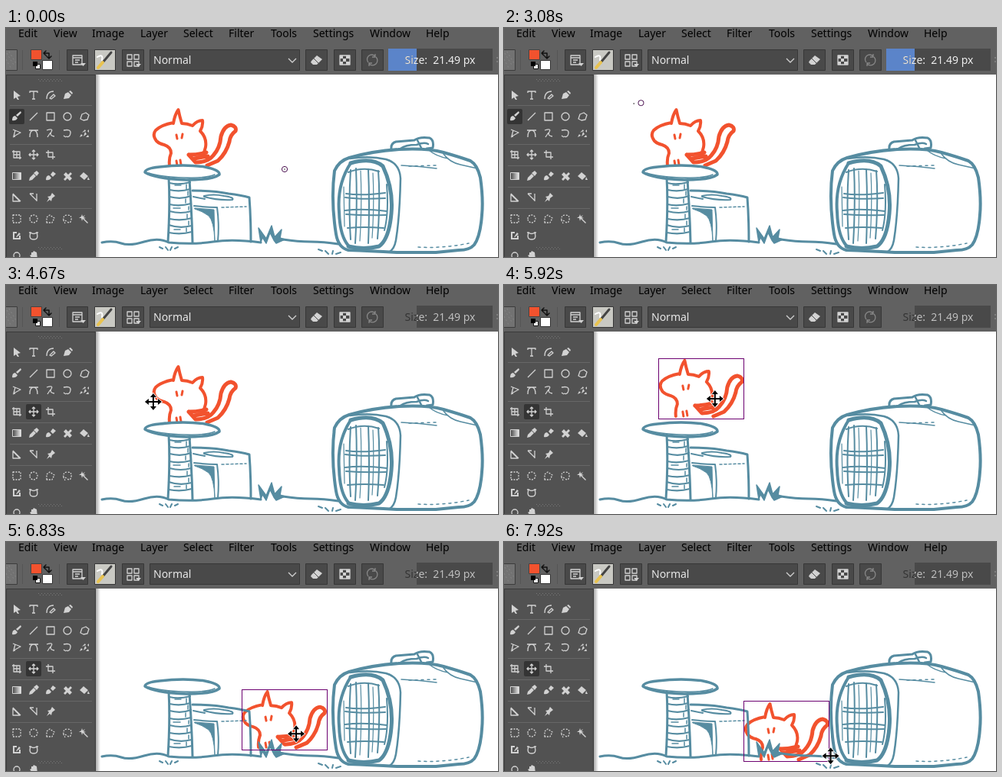
An HTML page for the animation above (8000 ms loop, 641 by 300 pixels).

```html
<!DOCTYPE html>
<html lang="en">
<head>
<meta charset="utf-8">
<title>Moving a drawing between layers</title>
<style>
html, body { margin: 0; width: 100%; height: 100%; overflow: hidden; background: #616161; }
svg { display: block; }
text { font: 14px "Noto Sans", "Open Sans", sans-serif; white-space: pre; }
.line { fill: none; stroke-linecap: round; stroke-linejoin: round; }
.btn { fill: #494949; stroke: #373737; }
.icon { fill: none; stroke: #d2d2d2; stroke-width: 1.3; stroke-linejoin: round; }
.solid { fill: #d2d2d2; }
</style>
</head>
<body>
<svg width="641" height="300" viewBox="0 0 641 300">
  <defs>
    <linearGradient id="shade"><stop stop-color="#a8a8a8"/><stop offset="1" stop-color="#fff"/></linearGradient>
    <linearGradient id="ramp"><stop stop-color="#444"/><stop offset="1" stop-color="#eee"/></linearGradient>
    <clipPath id="right"><path d="M535 20H641V60H535z"/></clipPath>
  </defs>

  <path fill="#fff" d="M117 61H641V300H117z"/>
  <path fill="url(#shade)" d="M117 61h6V300h-6z"/>

  <g id="cat" class="line" stroke="#f2522e" stroke-width="4">
    <path d="M218 124Q202 127 195 134Q190 140 196 148Q200 152 206 153Q215 156 215 164Q212 171 213 180M218 125Q220 113 224.500 107Q226 115 229 125Q236 125 243 128Q249 121 256 121Q257 128 253 135Q262 144 260 156L258 163"/>
    <path stroke-width="5" d="M238 166Q250 166 261 163M238 166L247 176Q263 176 270 167Q279 157 280 142Q284 128 293 127Q301 129 299 135Q292 140 291 149Q287 164 276 174L262 180M245 171L263 168"/>
    <path stroke-width="3" d="M222 140l1 5M230 139l-1 5M222 174l1 6M227 173l1 6"/>
  </g>

  <g class="line" stroke="#568ca1" stroke-width="3">
    <!-- ground and grass -->
    <path d="M125 281Q139 278 150 282T180 280T212 281Q245 284 270 280T332 281M361 277Q380 280 397 280T433 283"/>
    <path fill="#568ca1" stroke-width="1.500" d="M332 281L329 262L339 276L346 259L350 274L359 264L357 275L363 277L352 282L349 278L344 268L339 282L334 274z"/>
    <path stroke-width="2" d="M200 287l4 2M208 287l3 4M214 291l2-4M220 289l4-2M407 290l5 2M416 292l4 4M425 296l1-4M430 296l6-2"/>
    <!-- tower -->
    <path stroke-width="3.500" d="M181 189Q181 184 200 182Q232 178 259 182Q279 186 278 192Q269 199 235 199Q193 197 181 189z"/>
    <path stroke-width="1.500" d="M186 190Q202 195 232 196T272 192"/>
    <path d="M212 196Q214 232 211 280M239 199Q242 240 243 281"/>
    <path stroke-width="2.200" d="M213 203Q225 206 240 202M213 212Q227 215 240 211M213 221Q228 225 241 220M213 231Q226 234 241 230M213 240Q228 244 241 240M213 250Q228 253 242 249M212 258Q226 263 242 259M212 268Q228 271 242 267"/>
    <path stroke-width="1.500" d="M235 205v6M237 214v5M234 224v5M238 234v4M236 244v5M238 253v5M235 262v5M220 206h8M218 236h9M219 264h8"/>
    <!-- house -->
    <path d="M243 213Q273 213 290 217Q306 219 317 222Q319 248 319 280"/>
    <path stroke-width="2" d="M244 221L259 224M258 220Q270 217 284 220Q298 222 295 225Q275 226 258 221zM245 233Q262 235 275 235Q278 257 276 279"/>
    <path stroke-width="1.500" stroke-dasharray="3 3" d="M281 235L313 234"/>
    <path stroke-width="1" fill="#568ca1" d="M246 236L271 238L272 279Q271 253 264 246Q256 240 246 237z"/>
    <!-- carrier -->
    <path stroke-width="4" d="M428 187Q434 174 447 170Q479 161 512 159Q549 157 570 163T605 174Q614 179 618 196Q622 224 620 245Q618 273 610 284Q604 291 590 291L560 294L509 294Q473 292 446 291Q433 288 430 270Q423 226 428 187"/>
    <path stroke-width="2.500" d="M448 171Q474 167 495 172Q513 177 514 197Q513 247 508 278Q506 289 500 293"/>
    <path stroke-width="5" d="M449 177Q477 169 491 181Q505 211 502 243Q499 277 486 286Q466 291 446 286"/>
    <path stroke-width="4" d="M449 177Q431 205 434 241Q435 275 448 287"/>
    <path stroke-width="2" d="M449 186Q446 230 449 277M456 184Q458 230 455 282M472 185Q474 230 472 282M485 187Q488 226 484 276M496 205Q499 242 493 265"/>
    <path stroke-width="2" d="M446 189Q466 181 486 188M443 217Q463 220 494 216M442 222Q463 225 494 223M442 239Q464 236 496 240M443 244Q468 246 495 245M445 262Q466 260 492 262"/>
    <path stroke-width="1.200" d="M462 187Q464 230 461 279M478 190Q480 230 477 275M440 208l1 52"/>
    <path d="M502 159Q501 151 508 149L532 147Q539 142 552 144Q558 147 556 157L548 158"/>
    <path stroke-width="2.500" d="M514 158Q520 153 535 153Q545 149 550 152M536 147L541 157"/>
    <path stroke-width="1.500" d="M551 160Q560 168 576 171M570 165Q578 176 592 179L614 184M515 180Q539 181 561 184"/>
    <path stroke-width="1.500" stroke-dasharray="3 5" d="M525 181L560 180M537 287Q568 289 603 282"/>
  </g>
  <rect id="frame" width="111" height="79" fill="none" stroke="#6c0070"/>

  <!-- toolbar -->
  <path fill="#616161" d="M0 0H641V61H0z"/>
  <g id="menu"></g>
  <path fill="#727272" stroke="#3c3c3c" d="M-2 28.500H14.500V55.500H-2z"/>
  <path stroke="#858585" stroke-dasharray="2 3" d="M1 33l10 17M4 31l9 15M0 41l6 11"/>
  <path fill="#fff" stroke="#333" d="M47.500 42.500h13v12h-13z"/>
  <path fill="#f2522e" stroke="#444" d="M32.500 28.500h14v13h-14z"/>
  <path fill="#fff" stroke="#111" d="M38.500 47.500h6v6h-6z"/><path d="M35 44h6v6h-6z"/>
  <path class="line" stroke="#111" stroke-width="1.500" d="M52 30l-3 3 3 3M49 33h7v6M53 37l3 3 3-3"/>
  <path stroke="#555" d="M21.500 29v26M69.500 29v26"/>
  <path class="btn" d="M79.500 28.500h27v27h-27zM151.500 28.500h28v27h-28zM187.500 28.500h195v27h-195zM390.500 28.500h28v27h-28zM427.500 28.500h28v27h-28zM463.500 28.500h28v27h-28z"/>
  <path fill="#c9c9c3" stroke="#373737" d="M115.500 28.500h27v27h-27z"/>
  <path class="icon" d="M87 36h12v12h-12zM87 39h12M90 42h6M90 45h4"/>
  <path class="solid" d="M97 46h7l-3.500 4z"/>
  <path class="line" stroke="#444" stroke-width="3" d="M137 32L127 44"/>
  <path class="line" stroke="#e9c34f" stroke-width="4" d="M126 45L120 52"/>
  <path class="line" stroke="#fff" stroke-width="2" d="M119 38Q127 33 125 42"/>
  <path class="icon" d="M158 35h6v6h-6zM167 35h6v6h-6zM158 44h6v6h-6zM167 44h6v6h-6z"/>
  <path class="solid" d="M169 47h7l-3.500 4z"/>
  <path class="icon" d="M368 40l5 5 5-5"/>
  <path class="solid" d="M398 43l7-7 7 5-7 7h-5l-3-3z"/><path stroke="#494949" d="M401 40l6 6"/>
  <path class="icon" d="M435 36h13v12h-13z"/>
  <path class="solid" d="M435 36h4v4h-4zM443 36h5v4h-5zM439 40h4v4h-4zM435 44h4v4h-4zM443 44h5v4h-5z"/>
  <path class="icon" style="stroke:#888" d="M472 45a6 6 0 0 1 9-8M482 38a6 6 0 0 1-9 9M481 34v4h-4M473 50v-4h4"/>
  <path fill="#494949" d="M498 27H634V56H498z"/>
  <path id="fill" d="M498 27H535V56H498z"/>
  <path stroke="#999" stroke-dasharray="2 3" d="M640 38v9"/>
  <text x="192" y="47" fill="#e8e8e8">Normal</text>
  <text x="519.500" y="47" fill="#343434">Size:&#160; 21.49 px</text>
  <g id="clip"><text id="size" x="519.500" y="47">Size:&#160; 21.49 px</text></g>

  <!-- toolbox -->
  <path fill="#525252" d="M0 61H117V300H0z"/>
  <path stroke="#3a3a3a" d="M0 61.500H117M116.500 61V300M.5 61V300"/>
  <path stroke="#777" stroke-dasharray="1 3" d="M42 67.500h32M44 69.500h30"/>
  <path stroke="#676767" d="M5 101.500H112M5 152.500H112M5 180.500H112M5 208.500H112M5 236.500H112"/>
  <path stroke="#777" stroke-dasharray="1 3" d="M42 287.500h32M44 289.500h30"/>
  <rect id="active" width="20" height="20" rx="2" fill="#343434"/>
  <g id="tools"></g>

  <g id="brush" fill="none" stroke="#4a1050"><circle r="3.600"/></g>
  <circle id="dot" r=".8" fill="#222"/>
  <path id="arrow" stroke="#fff" d="M0 0V15L4 11.500L6.500 17.500L9 16.500L6.500 11H11z"/>
  <path id="move" stroke="#fff" stroke-width="1.600" paint-order="stroke" d="M0-11l4 5h-3v5h5v-3l5 4-5 4v-3h-5v5h3l-4 5-4-5h3v-5h-5v3l-5-4 5-4v3h5v-5h-3z"/>
</svg>
<script>
const $ = id => document.getElementById(id);

const menu = { Edit: 16, View: 62, Image: 112, Layer: 175, Select: 231, Filter: 290, Tools: 345, Settings: 400, Window: 474, Help: 547 };
$('menu').innerHTML = Object.entries(menu).map(([s, x]) => `<text x="${x}" y="12">${s}</text>`).join('');

// One row per line: centre y, then icons left to right; a leading * means filled
const rows = [
  [88, '*M-4-6L5 1L1 2L3 6L1 6L-1 3L-4 5z', 'M-5-3v-2h10v2M0-5v10M-2 5h4', 'M-5 5q0-10 9-10M-1 4l5-5 2 2-5 4z', '*M-5 5l2-7 4-2 4 4-3 4zM2-5l4 4 1-2-3-3z'],
  [116, '*M-6 5q0-6 4-6l3 3q-2 4-7 3zM-1-2l6-5 1 2-5 5z', 'M-5 5L5-5', 'M-5-5h10v10h-10z', 'M-5 0a5 5 0 0 1 10 0a5 5 0 0 1-10 0z', 'M-5 3l2-6 5-2 4 3-2 6-5 1z'],
  [138, 'M-5-5l10 4-9 5 2-8M-5 5l3-1', 'M-5 5q0-9 5-9t5 9M-6-4h12', 'M-5-4q9-3 6 2t4 6M-4 5l4-6', 'M-5-4q10-2 9 4t-6 4M-2 5l-3-2', '*M-6 5l2-4 2 2zM-1 4l2-6 2 3zM-3-1l4-4 1 2zM2 5l3-3 1 3zM4-3l2-2 0 4z'],
  [166, 'M-4-4h8v8h-8zM-6-4h3M3 4h3M-4-6v3M4 3v3M0-4v8M-4 0h8', 'M-6 0h12M0-6v12M-2-4l2-2 2 2M-2 4l2 2 2-2M-4-2l-2 2 2 2M4-2l2 2-2 2', 'M-3-6v9h9M-6-3h9v9'],
  [194, '', '*M-6 6l1-4 5-5 3 3-5 5zM0-4l4-3 3 3-3 4z', '*M-6 5q0-6 4-6l3 3q-2 4-7 3zM0-2l3-4 4 3-4 4z', '*M-5-2l3-3 3 3 3-3 2 2-3 3 3 3-3 3-3-3-3 3-2-2 3-3z', '*M-6 0l5-5 6 5-5 5zM5 1l2 4h-3z'],
  [222, 'M-5 5v-9l9 9zM-5-5l10 10', 'M-5-5l9 9M4-5v10M-5-5h5', '*M-5 6l3-5-2-2 4-1 2-4 4 4-4 3-1 4-2-2z'],
  [250, '-M-5-5h10v10h-10z', '-M-5 0a5 5 0 0 1 10 0a5 5 0 0 1-10 0z', '-M-5 5l0-7 4-3 6 4-3 6z', '-M-5 2q-1-7 5-7t5 6-5 3-5-2l2 4', '*M-1-1l6 6-1 1-6-6zM-3-6l1 3 3-2-2 3 3 1-4 1-1 3-1-4-3 0 3-2z'],
  [272, '*M-5-5h5v2h-3v6h6v-3h2v5h-10zM-1 2l4-6 2 2-5 4z', 'M-4-4q4 3 8 0q3 9-4 9t-4-9M-6-4h3M3-4h3'],
  [298, 'M-4 0a4 4 0 0 1 8 0a4 4 0 0 1-8 0zM3 3l4 4', '*M-5 0l2-1v-3h2l1-2 2 1 2 1 1 9h-6z']
];
$('tools').innerHTML = '<path fill="url(#ramp)" stroke="#d2d2d2" d="M8.500 189.500h11v9h-11z"/>' +
  rows.map(([y, ...icons]) => icons.map((d, i) =>
    `<path class="${d[0] == '*' ? 'solid' : 'icon'}" ${d[0] == '-' ? 'stroke-dasharray="2 1.500"' : ''}
      transform="translate(${14 + 22 * i} ${y})" d="${d.replace(/^[*-]/, '')}"/>`).join('')).join('');

// Keys: time, x, y
const pointer = [[0, 363, 185], [830, 364, 186], [2000, 365.5, 186.5], [2420, 365.5, 186.5], [2750, 300, 148],
  [3080, 180, 98], [3250, 101, 106], [3600, 42, 158], [3800, 36, 165], [4170, 36, 165], [4420, 110, 158],
  [4670, 193, 153], [4920, 253, 147], [5330, 263, 159], [5500, 263, 159], [5750, 267, 149], [5920, 275, 149],
  [6330, 344, 184], [6830, 378, 251], [7170, 384, 266], [7420, 392, 302], [7580, 402, 320], [7750, 425, 320],
  [7830, 440, 289], [7920, 425, 280]];
const boxPath = [[5500, 0, 0], [5750, 4, -11], [5920, 11, -8], [6330, 81, 19], [6830, 117, 89], [7170, 121, 103], [7250, 122, 104]];
const catPath = [[5500, 0, 0], [5750, 4, -11], [5920, 11, -8], [6330, 78.5, 17], [6830, 116, 89], [7170, 121, 103], [7250, 122, 105]];

function at(keys, t) {
  const i = keys.findIndex(k => k[0] > t);
  if (i == 0) return keys[0].slice(1);
  if (i < 0) return keys[keys.length - 1].slice(1);
  const [t0, x0, y0] = keys[i - 1], [t1, x1, y1] = keys[i], p = (t - t0) / (t1 - t0);
  return [x0 + (x1 - x0) * p, y0 + (y1 - y0) * p];
}
const place = (id, [x, y]) => $(id).setAttribute('transform', `translate(${x} ${y})`);
const show = (id, on) => $(id).setAttribute('visibility', on ? 'visible' : 'hidden');

function draw(now) {
  const step = 1000 / 12, t = Math.floor((now % 8000 + 4) / step) * step;
  const moving = t > 3820, pos = at(pointer, t), onCanvas = pos[0] > 117;

  place('cat', at(catPath, t));
  const [bx, by] = at(boxPath, t);
  place('frame', [Math.round(bx) + 190.5, Math.round(by) + 104.5]);
  show('frame', t > 5540);

  place('active', moving ? [26, 156] : [4, 106]);
  $('fill').setAttribute('fill', moving ? '#616161' : '#5b84c9');
  $('size').setAttribute('fill', moving ? '#c2c2c2' : '#f0f0f0');
  $('clip').setAttribute('clip-path', moving ? 'url(#right)' : 'none');

  for (const id of ['brush', 'arrow', 'move']) place(id, pos);
  place('dot', at(pointer, t + 20));
  show('brush', onCanvas && !moving);
  show('dot', onCanvas && !moving);
  show('arrow', !onCanvas);
  show('move', onCanvas && moving);
  requestAnimationFrame(() => draw(performance.now()));
}
draw(performance.now());
</script>
</body>
</html>
```
